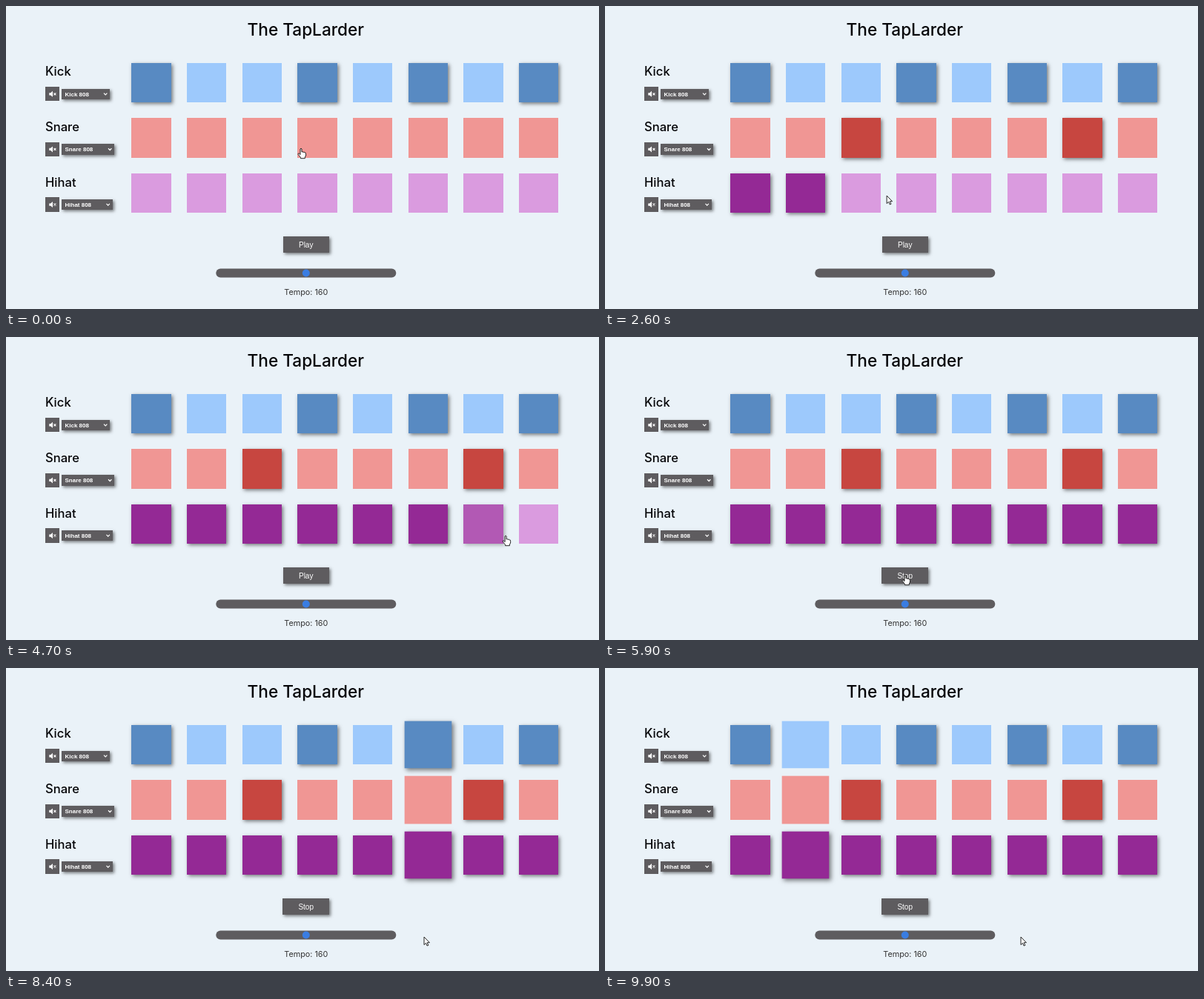
Write an HTML page that moves like this. It is 800x409 px and loops after 10000 ms.

```html
<!DOCTYPE html>
<html lang="en">
<head>
<meta charset="utf-8">
<title>Drum grid</title>
<style>
  html, body { margin: 0; width: 100%; height: 100%; overflow: hidden; background: #eaf2f8; }
  #stage { position: relative; width: 800px; height: 409px; overflow: hidden; }
  #stage div, svg { position: absolute; }
  svg { left: 0; top: 0; }
  .grey { background: #5e5c5f; }
  .raised { box-shadow: 1.5px 1.5px 4px rgba(0, 0, 0, .5); }
  text { font-family: Inter, "Open Sans", sans-serif; font-weight: 500; fill: #050508; }
  .label { font-size: 16.6px; }
  .ui { font: 10px "Liberation Sans", Arial, sans-serif; fill: #fff; }
  .option { font: bold 8px "Liberation Sans", Arial, sans-serif; fill: #fff; }
</style>
</head>
<body>
<div id="stage">
  <svg id="art" width="800" height="409">
    <text x="404.3" y="39.5" font-size="22.6" text-anchor="middle">The TapLarder</text>
    <rect x="283.3" y="354.5" width="243" height="12" rx="6" fill="#5e5c5f"/>
    <circle cx="404.8" cy="360.5" r="5" fill="#3a7de2"/>
    <text id="play" class="ui" x="404.7" y="325.6" text-anchor="middle">Play</text>
    <text x="404.8" y="390" font-size="10.8" text-anchor="middle" style="font-weight:400;fill:#333">Tempo: 160</text>
    <g id="rows"></g>
    <g id="cursor" stroke="#111" stroke-width=".9" stroke-linejoin="round" fill="#fff">
      <path id="arrow" d="M0 0V10.6L2.5 8.3L4.1 12L5.8 11.3L4.2 7.7H7.4Z"/>
      <path id="hand" d="M-1 1Q0-.8 1 1V5Q2.2 4.2 3 5.4Q4.3 4.6 5 5.9Q6.6 5.6 6.5 7.4V10L5.3 12V13.7H-.6V12.3L-4 8.2Q-4.2 6.4-2.5 7.2L-1 8.6Z"/>
    </g>
  </svg>
</div>
<script>
const LOOP = 10000, PITCH = 74.63, SIZE = 53.4, LEFT = 169.4, TOP = 76.8;
const FADE = 200, BEAT = 60000 / 160, SWELL = 300;
const PLAY_CLICK = 5850, FIRST_BEAT = PLAY_CLICK + BEAT;

// on[i]: time at which step i lights up (null = stays off)
const on = (steps, time) => Array.from({ length: 8 }, (_, i) => steps.includes(i) ? time(i) : null);
const tracks = [
  { name: 'Kick', menu: 65, off: [157, 201, 252], lit: [88, 138, 194],
    on: on([0, 3, 5, 7], () => -FADE) },
  { name: 'Snare', menu: 71, off: [240, 150, 148], lit: [199, 70, 64],
    on: on([2, 6], i => i === 2 ? 450 : 930) },
  { name: 'Hihat', menu: 68.5, off: [218, 155, 223], lit: [148, 41, 149],
    on: on([0, 1, 2, 3, 4, 5, 6, 7], i => 1640 + 491 * i) }
];

// Pointer tip: time, x, y
const path = [
  [0, 398, 192], [350, 345, 184], [480, 345, 184], [900, 646, 197], [1030, 646, 197],
  [1500, 214, 250], [2600, 380, 256], [4700, 674, 268], [5000, 716, 262], [5200, 716, 262],
  [5700, 405, 321], [5900, 405, 321], [6550, 604, 357], [7000, 604, 357],
  [7900, 564, 363], [8600, 564, 363], [9200, 561, 363], [LOOP, 561, 363]
];

const $ = id => document.getElementById(id);
const stage = $('stage'), art = $('art');
const clamp = v => Math.max(0, Math.min(1, v));
const smooth = v => v * v * (3 - 2 * v);
const mix = (a, b, k) => a + (b - a) * k;

function box(x, y, w, h, cls = '') {
  const el = document.createElement('div');
  el.className = cls;
  el.style.cssText = `left:${x}px;top:${y}px;width:${w}px;height:${h}px`;
  stage.insertBefore(el, art);
  return el;
}

const playBox = box(374, 311.3, 61.5, 21.8, 'grey raised');

tracks.forEach((track, r) => {
  const y = r * PITCH;
  box(53.4, 109 + y, 19, 19.3, 'grey');
  box(75, 111.6 + y, track.menu, 14.4, 'grey raised');
  track.pads = track.on.map((_, i) => box(LEFT + i * PITCH, TOP + y, SIZE, SIZE));
  $('rows').innerHTML += `<g transform="translate(0 ${y})">
    <text class="label" x="53" y="94.4">${track.name}</text>
    <text class="option" x="79.5" y="121.8">${track.name} 808</text>
    <path d="M${75 + track.menu - 8} 117.6l2.2 2.3l2.2-2.3" fill="none" stroke="#fff" stroke-width="1.2"/>
    <path d="M58.3 117.2h2l2.7-2.4v8l-2.7-2.4h-2z" fill="#fff"/>
    <path d="M64.4 117.3l3 3m0-3l-3 3" stroke="#fff" stroke-width="1.1"/>
  </g>`;
});

// Each step swells and shrinks back; its tail overlaps the next step.
function padScale(i, t) {
  const since = t - FIRST_BEAT - i * BEAT;
  if (since < 0) return 1;
  const age = since % (8 * BEAT);
  return 1 + .2 * smooth(clamp(1 - Math.abs(age - SWELL) / SWELL));
}

function pointer(t) {
  const n = path.findIndex(p => p[0] > t);
  const [t0, x0, y0] = path[n - 1], [t1, x1, y1] = path[n];
  const u = (t - t0) / (t1 - t0);
  const k = t0 >= 1500 && t1 <= 5000 ? u : smooth(u);
  return [mix(x0, x1, k), mix(y0, y1, k)];
}

function clickable(x, y) {
  const inside = (left, top, w, h) => x > left && x < left + w && y > top && y < top + h;
  if (inside(374, 311, 62, 22)) return true;
  const col = (x - LEFT + 4) % PITCH, row = (y - TOP + 4) % PITCH;
  return inside(LEFT, TOP, 580, 206) && col < SIZE + 9 && row < SIZE + 9;
}

function draw(t) {
  for (const { pads, on, off, lit } of tracks) {
    pads.forEach((pad, i) => {
      const k = on[i] === null ? 0 : clamp((t - on[i]) / FADE);
      pad.style.background = `rgb(${off.map((c, j) => mix(c, lit[j], k))})`;
      pad.style.boxShadow = `2px 2px 5px rgba(0,0,0,${.5 * k})`;
      pad.style.transform = `scale(${padScale(i, t)})`;
    });
  }
  const playing = t >= PLAY_CLICK;
  $('play').textContent = playing ? 'Stop' : 'Play';
  playBox.style.left = (playing ? 373.3 : 374) + 'px';
  playBox.style.width = (playing ? 62.8 : 61.5) + 'px';

  const [x, y] = pointer(t), hand = clickable(x, y);
  $('cursor').setAttribute('transform', `translate(${x} ${y})`);
  $('hand').style.display = hand ? '' : 'none';
  $('arrow').style.display = hand ? 'none' : '';
}

const start = performance.now();
function tick() {
  draw((performance.now() - start) % LOOP);
  requestAnimationFrame(tick);
}
tick();
</script>
</body>
</html>
```
